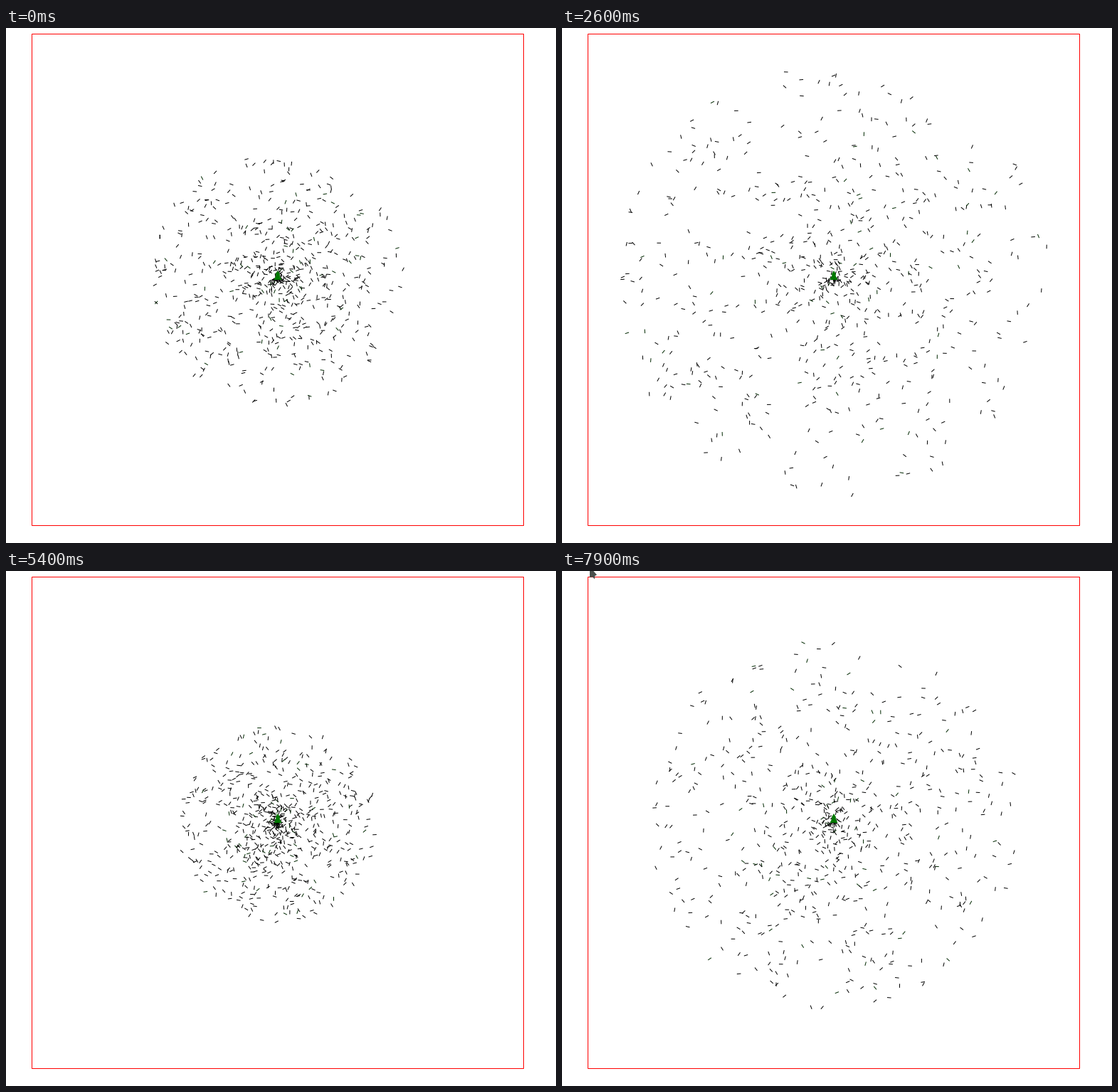
A matplotlib script that plays this animation: 773 px wide and 724 px high, repeating every 8000 ms.

```python
import numpy as np
import matplotlib.pyplot as plt
from matplotlib.animation import FuncAnimation
from matplotlib.collections import LineCollection
from matplotlib.patches import Polygon, Rectangle

W, H, DPI = 773, 724, 64
PX = 72 / DPI                     # one pixel in points
LEFT, TOP, SIDE = 36.5, 8.5, 691  # red arena
CX, CY = LEFT + SIDE / 2, TOP + SIDE / 2
COUNT, STEPS = 700, 41
TICK = 5.6                        # length of one walker
GROWTH = 9.7                      # spread per step of the fastest walker
RESTART = 21                      # step at which the second swarm appears


def make_swarm(seed):
    """Speed share, wandering bearing, radial jitter and facing per step."""
    rng = np.random.default_rng(seed)
    speed = (np.arange(COUNT) + rng.random(COUNT)) / COUNT
    start = rng.uniform(0, 2 * np.pi, COUNT)
    bearing = start + np.cumsum(rng.normal(0, 0.02, (STEPS, COUNT)), axis=0)
    jitter = rng.normal(0, 1.2, (STEPS, COUNT))
    facing = rng.uniform(0, np.pi, (STEPS, COUNT))
    return speed, bearing, jitter, facing


def wrap(v, low):
    return low + (v - low) % SIDE


def walkers(step):
    first = step < RESTART
    speed, bearing, jitter, facing = swarms[0 if first else 1]
    t = min(step, STEPS - 1.5)    # the last step lasts half as long
    reach = 179 + GROWTH * t if first else 101 + GROWTH * (t - 23)
    r = speed * reach + jitter[step]
    x = wrap(CX + r * np.cos(bearing[step]), LEFT)
    y = wrap(CY + r * np.sin(bearing[step]), TOP)
    dx = TICK / 2 * np.cos(facing[step])
    dy = TICK / 2 * np.sin(facing[step])
    return np.stack([np.column_stack([x - dx, y - dy]),
                     np.column_stack([x + dx, y + dy])], axis=1)


swarms = [make_swarm(5), make_swarm(29)]

fig = plt.figure(figsize=(W / DPI, H / DPI), dpi=DPI, facecolor="white")
ax = fig.add_axes([0, 0, 1, 1])
ax.set_xlim(0, W)
ax.set_ylim(H, 0)
ax.axis("off")

# Edges lie on pixel centres already, so snapping would shift them.
ax.add_patch(Rectangle((LEFT, TOP), SIDE, SIDE, fill=False, ec="#ff0000",
                       lw=PX, joinstyle="miter", snap=False, zorder=1))

shades = ["#002800" if i % 12 == 0 else "#000000" for i in range(COUNT)]
ticks = LineCollection([], colors=shades, linewidths=PX, capstyle="butt",
                       snap=False, zorder=2)
ax.add_collection(ticks, autolim=False)

nest = [(382, 341), (385, 346), (384.5, 348), (387.5, 354),
        (376.5, 354), (379.5, 348), (379, 346)]
ax.add_patch(Polygon(nest, fc="#007800", ec="none", zorder=3))

ARROW = np.array([(39, -1), (43.5, -1), (49, 5.5), (46, 7),
                  (46, 11.5), (43, 8.5), (39, 9)])
cursor = Polygon(ARROW, fc="#4a4f4c", ec="none", zorder=4)
ax.add_patch(cursor)


def draw(frame):
    step = STEPS - 1 if frame == 79 else frame // 2
    ticks.set_segments(walkers(step))
    cursor.set_visible(step >= STEPS - 2)
    cursor.set_xy(ARROW if step == STEPS - 1 else ARROW - (33, 2))
    return ticks, cursor


anim = FuncAnimation(fig, draw, frames=80, interval=100, repeat=True,
                     repeat_delay=0, init_func=lambda: draw(0))
plt.show()
```
